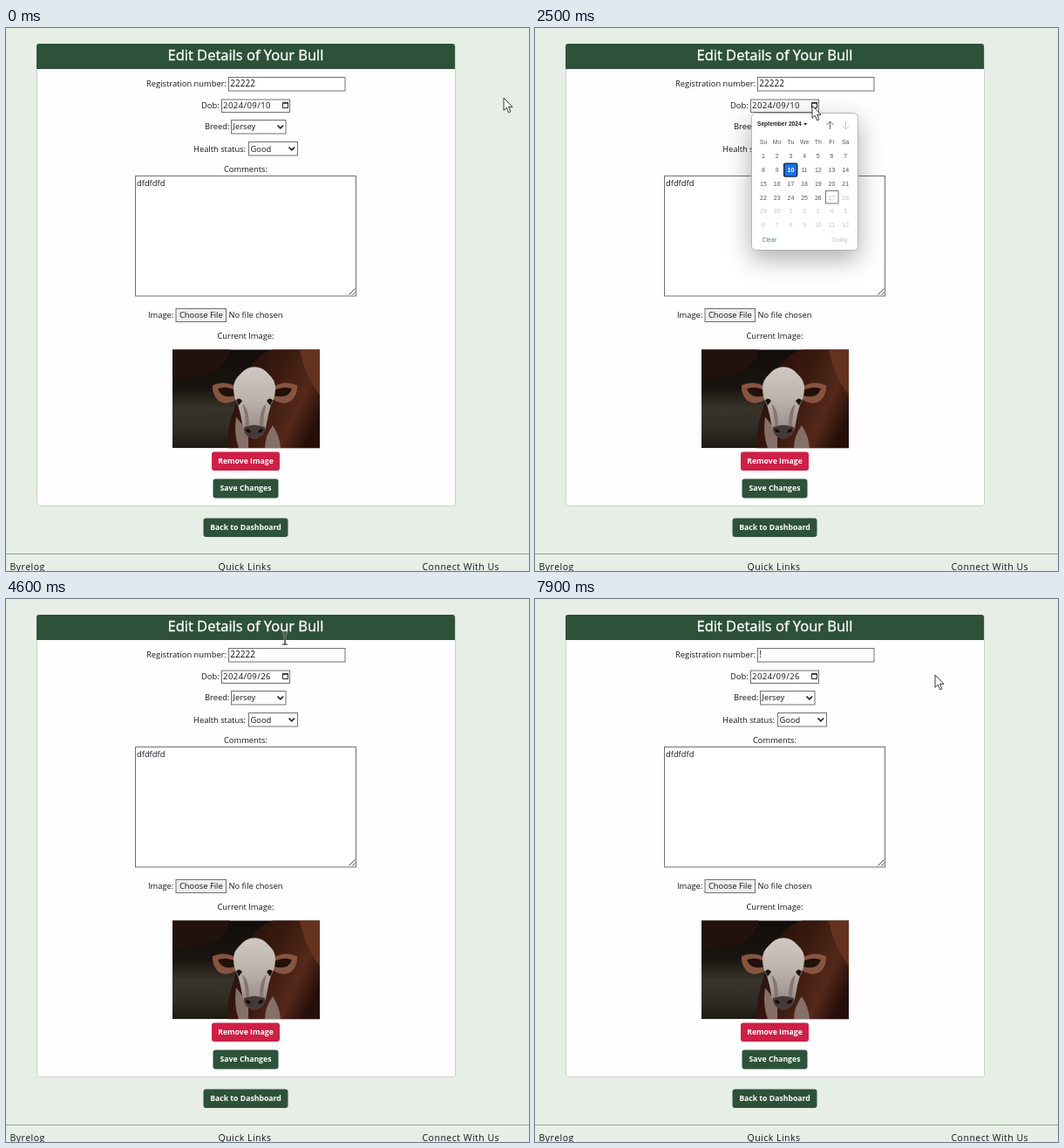
Animation, 600 px wide and 622 px high, one loop 8 s. Source, as an HTML page:

```html
<!DOCTYPE html>
<html lang="en">
<head>
<meta charset="utf-8">
<title>Edit details</title>
<style>
  html, body { margin: 0; height: 100%; overflow: hidden; background: #e7eee6; }
  svg { display: block; }
  #stage { width: 100vw; height: 100vh; font: 9.35px "Open Sans", "Noto Sans", sans-serif; fill: #12151a; }
  .mid { text-anchor: middle; }
  .title { font-size: 16.5px; fill: #fff; stroke: #fff; stroke-width: .35px; text-anchor: middle; }
  .field { fill: #fff; stroke: #707070; }
  .green { fill: #2d5239; }
  .button { fill: #fff; font-size: 8.7px; font-weight: 700; text-anchor: middle; }
  .footer { font-size: 10.5px; letter-spacing: .5px; }
  .value { font-size: 10px; fill: #111; }
  .date { font-size: 9.6px; letter-spacing: .4px; }
  .line { fill: none; stroke: #222; }
  #picker { font: 7px "Liberation Sans", Arial, sans-serif; fill: #555; }
  #picker .off { fill: #c4c4c6; }
  #picker .picked { fill: #fff; font-weight: 700; }
</style>
</head>
<body>
<svg id="stage" viewBox="0 0 600 622">
  <defs>
    <linearGradient id="meadow" x2="0" y2="1">
      <stop offset="0" stop-color="#130d0a"/><stop offset=".4" stop-color="#1a1410"/>
      <stop offset=".6" stop-color="#39342a"/><stop offset=".8" stop-color="#312d24"/><stop offset="1" stop-color="#1d1a14"/>
    </linearGradient>
    <linearGradient id="hide" x2="1" y2=".5">
      <stop offset="0" stop-color="#1d0e0a"/><stop offset=".5" stop-color="#3a190f"/>
      <stop offset=".8" stop-color="#54291b"/><stop offset="1" stop-color="#260f0a"/>
    </linearGradient>
    <linearGradient id="face" x2="0" y2="1">
      <stop offset="0" stop-color="#d0c8c2"/><stop offset=".45" stop-color="#bdb3ad"/>
      <stop offset=".8" stop-color="#a0958f"/><stop offset="1" stop-color="#655a56"/>
    </linearGradient>
    <filter id="shadow" x="-50%" y="-50%" width="200%" height="200%">
      <feDropShadow dx="0" dy="10" stdDeviation="14" flood-color="#000" flood-opacity=".32"/>
    </filter>
    <filter id="soft"><feGaussianBlur stdDeviation=".7"/></filter>
  </defs>

  <rect width="600" height="622" fill="#e7eee6"/>
  <rect x="35.5" y="18.5" width="480" height="529" rx="3" fill="#fefefe" stroke="#c9d0c9"/>
  <path class="green" d="M35 47V21q0-3 3-3h474q3 0 3 3v26z"/>
  <text class="title" x="275" y="37.3">Edit Details of Your Bull</text>

  <text x="161" y="67">Registration number:</text>
  <rect id="number-box" class="field" x="255.5" y="56.5" width="133.5" height="15.5"/>
  <rect id="selection" x="257" y="58.5" width="29.5" height="12" fill="#0078d7"/>
  <text id="number" class="value" x="257.3" y="67"></text>
  <path id="caret" class="line" d="M260.5 59v11"/>

  <text x="224" y="92">Dob:</text>
  <rect class="field" x="247.5" y="82" width="78" height="14.5"/>
  <text id="date" class="date" x="249" y="92"></text>
  <path class="line" d="M317.5 85.5h6v6h-6zM317 86.2h7"/>

  <text x="228" y="116">Breed:</text>
  <rect class="field" x="258.5" y="105.5" width="62.5" height="15.5"/>
  <text x="260.5" y="116">Jersey</text>
  <path class="line" d="M311.5 111.5l3.3 3.3 3.3-3.3" stroke-width="1.7"/>

  <text x="215" y="142">Health status:</text>
  <rect class="field" x="278.5" y="130.5" width="56" height="15.5"/>
  <text x="280.5" y="142">Good</text>
  <path class="line" d="M324.5 136.5l3.3 3.3 3.3-3.3" stroke-width="1.7"/>

  <text class="mid" x="275" y="165">Comments:</text>
  <rect class="field" x="148.5" y="169.5" width="253" height="137.5"/>
  <text x="150" y="180.5">dfdfdfd</text>
  <path class="line" d="M393.5 305.5l7-7M397.5 305.5l3-3" stroke-width=".8"/>

  <text x="163" y="331.5">Image:</text>
  <rect class="field" x="195" y="321.5" width="57.5" height="15" style="fill:#efefef"/>
  <text class="mid" x="223.8" y="331.5">Choose File</text>
  <text x="255.5" y="332">No file chosen</text>
  <text class="mid" x="275" y="356">Current Image:</text>

  <svg x="191" y="368.3" width="169" height="113">
    <rect width="169" height="113" fill="url(#meadow)"/>
    <g filter="url(#soft)">
      <path d="M0 0h66q-6 24-30 28T0 32z" fill="#22120d"/>
      <path d="M82 30Q98 4 116 0h60v120H64q-3-26 6-50z" fill="url(#hide)"/>
      <path d="M146 0h26v56q-20-24-26-56z" fill="#65321f"/>
      <path d="M76 113q-6-16-3-36l14 18v18zM106 113q0-14 9-26 8 12 9 26z" fill="#857068"/>
      <path d="M75 44Q60 34 46 41q-1 10 7 18 10 6 22-3zM113 44q16-10 30-3 1 10-7 18-10 6-22-3z" fill="#86543f"/>
      <path d="M73 47q-12-6-21-2 4 12 20 8zM116 47q12-6 21-2-4 12-20 8z" fill="#22100b"/>
      <path d="M94 20q10 0 17 9 7 6 7 15 0 11-5 19-3 10-5 22-2 16-14 17-12-1-14-17-2-12-5-22-5-8-5-19 0-9 7-15 7-9 17-9z" fill="url(#face)"/>
      <path d="M80 62q8 6 8 24l-4 3q0-14-4-27zM108 62q-8 6-8 24l4 3q0-14 4-27z" fill="#85766f"/>
      <path d="M73 58q4-4 7 1l-4 5zM115 58q-4-4-7 1l4 5z" fill="#1a1210"/>
      <path d="M82 89q12-5 24 0 1 10-12 14-13-4-12-14z" fill="#463a37"/>
      <path d="M84 91q5-1 6 4-6 1-6-4zM104 91q-5-1-6 4 6 1 6-4z" fill="#120d0d"/>
    </g>
  </svg>

  <rect x="236" y="485.5" width="78" height="21.5" rx="3" fill="#ce1f46"/>
  <text class="button" x="275" y="499.3">Remove Image</text>
  <rect class="green" x="237.5" y="516.5" width="75" height="22" rx="3"/>
  <text class="button" x="275" y="530.3">Save Changes</text>
  <rect class="green" x="226.5" y="561.5" width="97" height="21.5" rx="3"/>
  <text class="button" x="275" y="575.3">Back to Dashboard</text>

  <path d="M0 602.5h600" stroke="#8fa395"/>
  <g class="footer">
    <text x="4.5" y="621">Byrelog</text>
    <text x="243.5" y="621">Quick Links</text>
    <text x="477.5" y="621">Connect With Us</text>
  </g>

  <g id="picker">
    <rect x="248.5" y="97.5" width="122" height="157" rx="5" fill="#fff" stroke="#b4b4b8" filter="url(#shadow)"/>
    <text x="255" y="112" font-size="6.6" font-weight="700" fill="#222">September 2024</text>
    <path d="M308 109h4.4l-2.2 2.5z" fill="#222"/>
    <path class="line" d="M338.5 116v-9m-4 4l4-4 4 4" style="stroke:#666"/>
    <path class="line" d="M356.5 107v9m-4-4l4 4 4-4" style="stroke:#c8c8c8"/>
    <rect id="picked" width="15" height="15" rx="1.5" fill="#1a73e8" stroke="#15233c" stroke-width="1.4"/>
    <rect x="333.5" y="186.5" width="14.5" height="14.5" fill="none" stroke="#777"/>
    <g id="days" class="mid"></g>
    <text x="260.5" y="245.3" style="fill:#4d8583">Clear</text>
    <text class="off" x="340" y="245.3">Today</text>
  </g>

  <path id="arrow" d="M0 0V14.3L3.3 11.2 5.7 16.8 7.9 15.8 5.6 10.4H10z" fill="#fff" stroke="#222" stroke-width=".9"/>
  <g id="beam" fill="none">
    <path d="M-3-6.5h6M0-6.5v13M-3 6.5h6" stroke="#fff" stroke-opacity=".7" stroke-width="2.6"/>
    <path d="M-3-6.5h6M0-6.5v13M-3 6.5h6" stroke="#111" stroke-width="1.2"/>
  </g>
</svg>
<script>
const LOOP = 8000, STEP = 100;
const $ = id => document.getElementById(id);
const show = (id, on) => $(id).style.display = on ? '' : 'none';
const place = (id, x, y) => $(id).setAttribute('transform', `translate(${x} ${y})`);

// Pointer path: time, x, y
const path = [
  [0, 571, 80], [300, 585, 83], [500, 572, 86], [1300, 572, 86], [1500, 520, 90],
  [1700, 385, 88], [1900, 309, 84], [2200, 318, 89], [2700, 318, 89], [2900, 345, 130],
  [3100, 347, 190], [3250, 325, 225], [3400, 308, 205], [3500, 318, 193], [4200, 318, 193],
  [4400, 319, 120], [4600, 320, 45.5], [4800, 313, 65], [5100, 312, 65], [7300, 312, 65],
  [7500, 375, 82], [7700, 464, 92], [7900, 459, 87], [LOOP, 459, 87]
];

function pointerAt(t) {
  const i = path.findIndex(p => p[0] > t);
  const [t0, x0, y0] = path[i - 1], [t1, x1, y1] = path[i];
  const k = (t - t0) / (t1 - t0);
  return [x0 + (x1 - x0) * k, y0 + (y1 - y0) * k];
}

const dayX = day => 262 + (day - 1) % 7 * 15.7;
const dayY = day => 149.4 + Math.floor((day - 1) / 7) * 15.7;

function addDay(label, x, y, off) {
  const text = document.createElementNS('http://www.w3.org/2000/svg', 'text');
  text.textContent = label;
  text.setAttribute('x', x);
  text.setAttribute('y', y);
  if (off) text.classList.add('off');
  $('days').append(text);
  return text;
}

['Su', 'Mo', 'Tu', 'We', 'Th', 'Fr', 'Sa'].forEach((name, i) => addDay(name, dayX(i + 1), 132.6));
const days = Array.from({ length: 42 }, (_, i) =>
  addDay(i < 30 ? i + 1 : i - 29, dayX(i + 1), dayY(i + 1), i >= 26));

function draw(now) {
  const t = Math.floor(now % LOOP / STEP) * STEP;
  const focused = t >= 4800 && t < 7800, typed = t >= 6000;
  const selected = t >= 5200 && !typed;

  const box = $('number-box').style;
  box.stroke = focused ? '#000' : '';
  box.strokeWidth = focused ? 2 : 1;
  show('selection', selected);
  show('caret', focused && typed);
  $('number').textContent = typed ? '!' : '22222';
  $('number').style.fill = selected ? '#fff' : '';
  $('date').textContent = t < 4300 ? '2024/09/10' : '2024/09/26';

  const day = t < 4200 ? 10 : 26;
  show('picker', t >= 2400 && t < 4300);
  place('picked', dayX(day) - 7.7, dayY(day) - 10);
  days.forEach((text, i) => text.classList.toggle('picked', i + 1 === day));

  const beam = t >= 4500 && t < 7500;
  show('beam', beam);
  show('arrow', !beam);
  place(beam ? 'beam' : 'arrow', ...pointerAt(t));
}

const start = performance.now();
function tick() {
  draw(performance.now() - start);
  requestAnimationFrame(tick);
}
tick();
</script>
</body>
</html>
```
